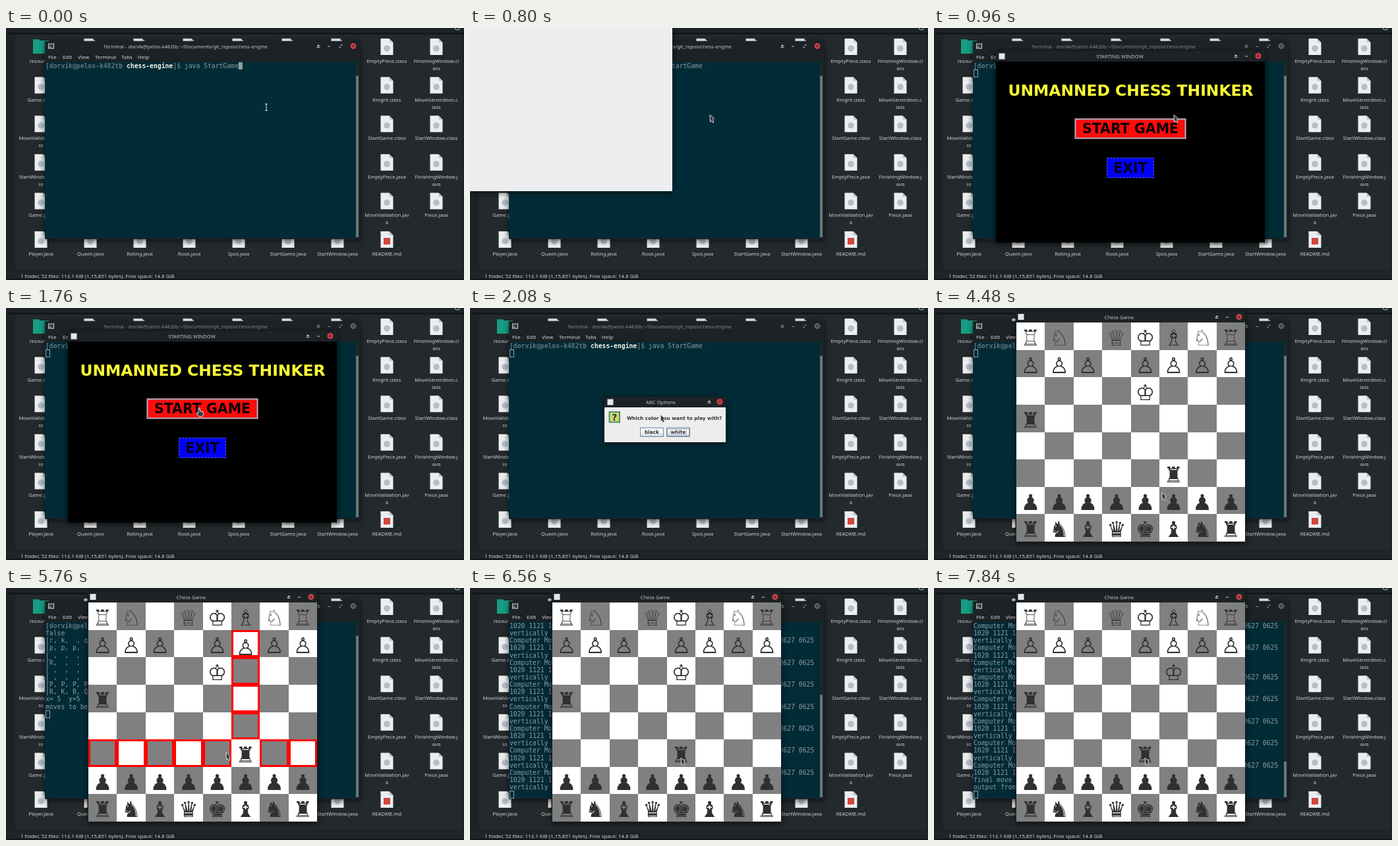
These frames come from a looping animation (695 px wide and 383 px high, 8 s). An HTML page with a canvas:

```html
<!DOCTYPE html>
<html lang="en">
<head>
<meta charset="utf-8">
<title>Chess desktop</title>
<style>
html, body { margin: 0; width: 100%; height: 100%; overflow: hidden; background: #23292c; }
canvas { display: block; }
</style>
</head>
<body>
<canvas id="stage" width="695" height="383"></canvas>
<script>
const ctx = document.getElementById('stage').getContext('2d');
const LOOP = 8000, STEP = 160;
const ui = size => `${size}px "Noto Sans", sans-serif`;
const UI = ui(7.63);
const MONO = '9.73px "DejaVu Sans Mono", monospace';
const bold = size => `bold ${size}px "DejaVu Sans", sans-serif`;
const CHAR = 5.857, LINE = 11.14, ROWS = 24;
const USER = 'dorvik@pelos-k482tb';

function rect(x, y, w, h, color) {
  ctx.fillStyle = color;
  ctx.fillRect(x, y, w, h);
}

function frame(x, y, w, h, color, width = 1) {
  ctx.strokeStyle = color;
  ctx.lineWidth = width;
  ctx.strokeRect(x + width / 2, y + width / 2, w - width, h - width);
}

function text(str, x, y, color, font = UI, align = 'left') {
  ctx.font = font;
  ctx.fillStyle = color;
  ctx.textAlign = align;
  ctx.fillText(str, x, y);
}

function line(color, width, ...points) {
  ctx.strokeStyle = color;
  ctx.lineWidth = width;
  ctx.beginPath();
  for (let i = 0; i < points.length; i += 2) ctx.lineTo(points[i], points[i + 1]);
  ctx.stroke();
}

function polygon(fill, stroke, ...points) {
  ctx.beginPath();
  for (let i = 0; i < points.length; i += 2) ctx.lineTo(points[i], points[i + 1]);
  ctx.closePath();
  ctx.fillStyle = fill;
  ctx.fill();
  if (stroke) {
    ctx.strokeStyle = stroke;
    ctx.lineWidth = 1;
    ctx.stroke();
  }
}

function circle(x, y, r, color) {
  ctx.fillStyle = color;
  ctx.beginPath();
  ctx.arc(x, y, r, 0, 7);
  ctx.fill();
}

function shadowed(x, y, w, h, color) {
  ctx.save();
  ctx.shadowColor = 'rgba(0,0,0,.65)';
  ctx.shadowBlur = 9;
  ctx.shadowOffsetY = 2;
  rect(x, y, w, h, color);
  ctx.restore();
}

// ---- File manager ----
const files = [
  [0, 0, 'resources'], [0, 1, 'Game.class'], [0, 2, 'MoveValidation.cla', 'ss'],
  [0, 3, 'StartWindow$1.cla', 'ss'], [0, 4, 'Game.java'],
  [1, 0, ''], [2, 0, ''], [3, 0, ''], [4, 0, ''], [5, 0, ''], [6, 0, ''],
  [7, 0, 'EmptyPiece.class'], [8, 0, 'FinishingWindow.cl', 'ass'],
  [7, 1, 'Knight.class'], [8, 1, 'MoveGeneration.c', 'lass'],
  [7, 2, 'StartGame.class'], [8, 2, 'StartWindow.class'],
  [7, 3, 'EmptyPiece.java'], [8, 3, 'FinishingWindow.j', 'ava'],
  [7, 4, 'MoveValidation.jav', 'a'], [8, 4, 'Piece.java'],
  ...['Player.java', 'Queen.java', 'Rating.java', 'Rook.java', 'Spot.java',
    'StartGame.java', 'StartWindow.java', 'README.md'].map((name, i) => [i, 5, name])
];

function fileIcon(x, y, name) {
  if (name === 'resources') {
    rect(x - 12, y + 1, 10, 5, '#138a72');
    rect(x - 12, y + 3, 24, 20, '#16a085');
    return;
  }
  polygon('#eceeef', null, x - 9.5, y, x + 3.5, y, x + 9.5, y + 6, x + 9.5, y + 25, x - 9.5, y + 25);
  polygon('#c4c9cc', null, x + 3.5, y, x + 9.5, y + 6, x + 3.5, y + 6);
  if (name === 'README.md') rect(x - 5, y + 10, 10, 10, '#d0443e');
  else circle(x, y + 15, 4.8, '#b3bfcb');
}

function desktop() {
  rect(0, 0, 695, 383, '#23292c');
  rect(0, 0, 14, 368, '#1c2124');
  rect(0, 0, 695, 7, '#1c2225');
  rect(0, 7, 695, 3, '#14181a');
  rect(692, 10, 3, 358, '#1e2427');
  rect(0, 368, 695, 15, '#1e2427');
  rect(0, 381, 695, 2, '#121618');
  ctx.strokeStyle = '#b5bbbd';
  ctx.lineWidth = 1;
  ctx.beginPath();
  ctx.arc(685, -1, 4, 0, Math.PI);
  ctx.stroke();
  for (const [col, row, ...label] of files) {
    const x = 53 + col * 75, y = 16 + row * 58.6;
    fileIcon(x, y, label[0]);
    label.forEach((part, i) => text(part, x, y + 37 + i * 11, '#cdd1d2', UI, 'center'));
  }
  text('1 folder, 52 files: 113.1 KiB (1,15,851 bytes), Free space: 14.8 GiB', 22, 379.5, '#cdd1d2', ui(7.87));
}

// ---- Window chrome ----
function titleBar(x, y, w, title, center, active, buttons) {
  const color = active ? '#c3c8ca' : '#858c8f';
  rect(x, y, w, 16, '#1c2225');
  text(title, center, y + 10.5, color, UI, 'center');
  const cy = y + 7.5, [raise, minimize, maximize, close] = buttons;
  polygon(color, null, raise - 2.5, cy + 0.5, raise, cy - 2.5, raise + 2.5, cy + 0.5);
  rect(raise - 2.5, cy + 1.5, 5, 1, color);
  if (minimize) rect(minimize - 2, cy, 4, 1, color);
  if (maximize) {
    line(color, 1, maximize, cy - 2, maximize + 2, cy - 2, maximize + 2, cy);
    line(color, 1, maximize - 2, cy, maximize - 2, cy + 2, maximize, cy + 2);
  }
  circle(close, cy, 4.5, active ? '#cf3d45' : '#596164');
  line('#1c2225', 1, close - 1.7, cy - 1.7, close + 1.7, cy + 1.7);
  line('#1c2225', 1, close - 1.7, cy + 1.7, close + 1.7, cy - 1.7);
}

function appIcon(x, y) {
  rect(x - 4.5, y - 4.5, 9, 9, '#e6e8e9');
}

// ---- Terminal ----
const output = [
  '', 'false', '[r, k,  , q, k, b, k, r]', '[p, p, p,  , p, p, p, p]',
  '[ ,  ,  ,  , k,  ,  ,  ]', '[R,  ,  ,  ,  ,  ,  ,  ]', '[ ,  ,  ,  ,  ,  ,  ,  ]',
  '[ ,  ,  ,  ,  , R,  ,  ]', '[P, P, P, P, P, P, P, P]', '[R, K, B, Q, K, B, K, R]',
  'x= 5  y=5', 'moves to be shown'
];
const FINAL_LINES = 115;
const searchLines = ['Computer Moves'.padEnd(70) + '0627 0625', '1020 1121 1222', 'vertically'];

function outputLine(i) {
  if (i < output.length) return output[i];
  const row = i - (FINAL_LINES - 23);
  if (row === 21) return 'final move';
  if (row === 22) return 'output from computer';
  if (row === 5) return 'Computer Moves';
  return searchLines[((row > 5 ? row - 1 : row) + 99) % 3];
}

function lineCount(t) {
  if (t < 320) return 0;
  if (t < 5120) return 1;
  const search = Math.min(1, Math.max(0, (t - 6240) / 1280));
  return Math.round(output.length + search * (FINAL_LINES - output.length));
}

function prompt(y) {
  const put = (str, col, color, font = MONO) => text(str, 60 + col * CHAR, y, color, font);
  put('[' + USER, 0, '#5d757b', 'bold ' + MONO);
  put('chess-engine', 21, '#f5f3e6', 'bold ' + MONO);
  put(']$', 33, '#5d757b', 'bold ' + MONO);
  put('java StartGame', 36, '#8a9c9e');
}

function terminal(t, active) {
  shadowed(59, 20, 478, 301, '#1c2225');
  titleBar(59, 20, 478, `Terminal - ${USER}:~/Documents/git_repos/chess-engine`, 272.5, active, [474, 490, 508, 527]);
  rect(64, 23.5, 9, 8, '#d5d9da');
  rect(65, 24.5, 7, 6, '#30383b');
  text('>_', 65.3, 29.5, '#fff', bold(4.5));
  [['File', 64], ['Edit', 86], ['View', 109], ['Terminal', 135], ['Tabs', 175], ['Help', 200]]
    .forEach(([name, x]) => text(name, x, 47, '#d0d4d5', ui(7.87)));
  rect(59, 51, 471, 268, '#012b36');
  rect(530, 51, 6, 268, '#162a30');

  const count = lineCount(t), top = Math.max(0, count - ROWS + 1);
  for (let i = top; i < Math.max(1, count); i++) {
    const y = 61 + (i - top) * LINE;
    if (i) text(outputLine(i), 60, y, '#8a9c9e', MONO);
    else prompt(y);
  }
  const x = count ? 60 : 60 + 50 * CHAR, y = 52 + (count - top) * LINE;
  if (active) rect(x, y, 6, 11, '#93a1a1');
  else frame(x, Math.round(y), 7, 12, '#93a1a1');

  const thumb = 266 * ROWS / (26 + top);
  rect(531, 318 - thumb, 4, thumb, '#69777b');
}

// ---- Java windows ----
function startWindow() {
  shadowed(94, 35, 408, 291, '#000');
  titleBar(94, 35, 408, 'STARTING WINDOW', 282, true, [458, 474, 0, 492]);
  appIcon(103, 43);
  text('UNMANNED CHESS THINKER', 298.5, 102.5, '#ffff33', bold(23.4), 'center');
  rect(213.5, 137.5, 169, 31, '#ff0b0b');
  frame(213.5, 137.5, 169, 31, '#9fb1c1', 2);
  text('START GAME', 298, 160, '#080000', bold(20.5), 'center');
  rect(262, 197, 72, 31, '#0000ff');
  ctx.setLineDash([3, 2]);
  frame(262, 197, 72, 31, '#56649a');
  ctx.setLineDash([]);
  text('EXIT', 298, 220, '#000010', bold(20.5), 'center');
}

function dialogButton(label, x, focused) {
  const shade = ctx.createLinearGradient(0, 182, 0, 196);
  shade.addColorStop(0, '#e4ecf4');
  shade.addColorStop(0.4, '#ffffff');
  shade.addColorStop(1, '#bccddd');
  rect(x, 181.5, 36, 14.5, shade);
  frame(x, 181.5, 36, 14.5, '#7a8a99');
  if (focused) {
    frame(x + 1, 182.5, 34, 12.5, '#8fa4b8');
    frame(x + 5, 184.5, 26, 8.5, '#a3b8cc', 0.7);
  }
  text(label, x + 18, 191.3, '#2b2b2b', bold(7.3), 'center');
}

function colorDialog() {
  shadowed(204, 135, 184, 69, '#ededee');
  titleBar(204, 135, 184, 'ABC Options', 289.5, true, [363, 0, 0, 379]);
  appIcon(213, 143);
  rect(210.5, 157, 17.5, 17.5, '#4c8f74');
  rect(212.5, 159, 13.5, 13.5, '#d7d66b');
  text('?', 219.3, 171, '#173b35', bold(14), 'center');
  text('Which color you want to play with?', 238, 169.5, '#333', bold(7.3));
  dialogButton('black', 258, false);
  dialogButton('white', 298, true);
}

// ---- Chess ----
const CELL_W = 347 / 8, CELL_H = 333 / 8;

function boardRows(t) {
  const rookMoved = t >= 6240, kingMoved = t >= 7680;
  return [
    '♖♘ ♕♔♗♘♖', '♙♙♙ ♙♙♙♙', kingMoved ? '     ♔  ' : '    ♔   ', '♜       ', '        ',
    rookMoved ? '    ♜   ' : '     ♜  ', '♟♟♟♟♟♟♟♟', '♜♞♝♛♚♝♞♜'
  ];
}

function isReachable(col, row) {
  return (row === 5 && col !== 5) || (col === 5 && row >= 1 && row <= 4);
}

function chessWindow(t, active) {
  shadowed(123.5, 6, 349, 350, '#1c2225');
  titleBar(124, 6, 348, 'Chess Game', 281, active, [429, 445, 0, 463]);
  appIcon(132, 13.5);
  const showMoves = t >= 5120 && t < 6240;
  boardRows(t).forEach((pieces, row) => [...pieces].forEach((piece, col) => {
    const x = Math.round(125 + col * CELL_W), y = Math.round(22 + row * CELL_H);
    const w = Math.round(125 + (col + 1) * CELL_W) - x, h = Math.round(22 + (row + 1) * CELL_H) - y;
    const marked = showMoves && isReachable(col, row);
    rect(x, y, w, h, (row + col) % 2 ? '#808080' : '#fff');
    if (marked) frame(x, y, w, h, '#ff0000', 3);
    text(piece + '\uFE0E', x + w / 2, y + (marked ? 38 : 35), '#303030', '33px "DejaVu Sans", sans-serif', 'center');
  }));
}

// ---- Pointer: time, x, y of its tip ----
const pointerPath = [
  [0, 395, 120], [480, 395, 120], [800, 364, 132], [1120, 364, 132], [1760, 293, 152],
  [2080, 289, 162], [2560, 276, 186], [3520, 276, 186], [4320, 340, 290], [4960, 363, 252],
  [5280, 363, 252], [5760, 334, 250], [6240, 320, 258], [8000, 320, 258]
];

function pointer(t) {
  if (t >= 2880 && t < 3520) return;
  const i = pointerPath.findIndex(key => key[0] > t);
  const [t0, x0, y0] = pointerPath[i - 1], [t1, x1, y1] = pointerPath[i];
  const k = (t - t0) / (t1 - t0);
  ctx.save();
  ctx.translate(x0 + (x1 - x0) * k, y0 + (y1 - y0) * k);
  if (t < 640) {
    line('#d8dcdd', 1, 0, -4, 0, 5);
    line('#d8dcdd', 1, -2, -4.5, 2, -4.5);
    line('#d8dcdd', 1, -2, 5.5, 2, 5.5);
  } else if (t >= 1600 && t < 1920) {
    polygon('#333a3d', '#e4e7e8', -1, 0, 1, 0, 1.5, 5, 6, 6, 6.5, 9, 5, 13, 0, 13, -4, 8, -3, 7, -1, 8);
  } else {
    polygon('#343b3e', '#d5d9da', 0, 0, 6.5, 5.5, 4.5, 7, 6, 11, 4, 12, 2, 9, 0.5, 10.5);
  }
  ctx.restore();
}

function render(t) {
  const chessOpen = t >= 2880;
  const terminalActive = t < 960 || (t >= 2720 && t < 3520);
  desktop();
  terminal(t, terminalActive);
  if (t >= 640 && t < 960) shadowed(0, 0, 307, 248, '#ededef');
  if (t >= 960 && t < 1920) startWindow();
  if (t >= 1920 && t < 2720) colorDialog();
  if (chessOpen) chessWindow(t, !terminalActive);
  pointer(t);
}

function tick(now) {
  render(Math.floor(now % LOOP / STEP) * STEP);
  requestAnimationFrame(tick);
}
requestAnimationFrame(tick);
</script>
</body>
</html>
```
